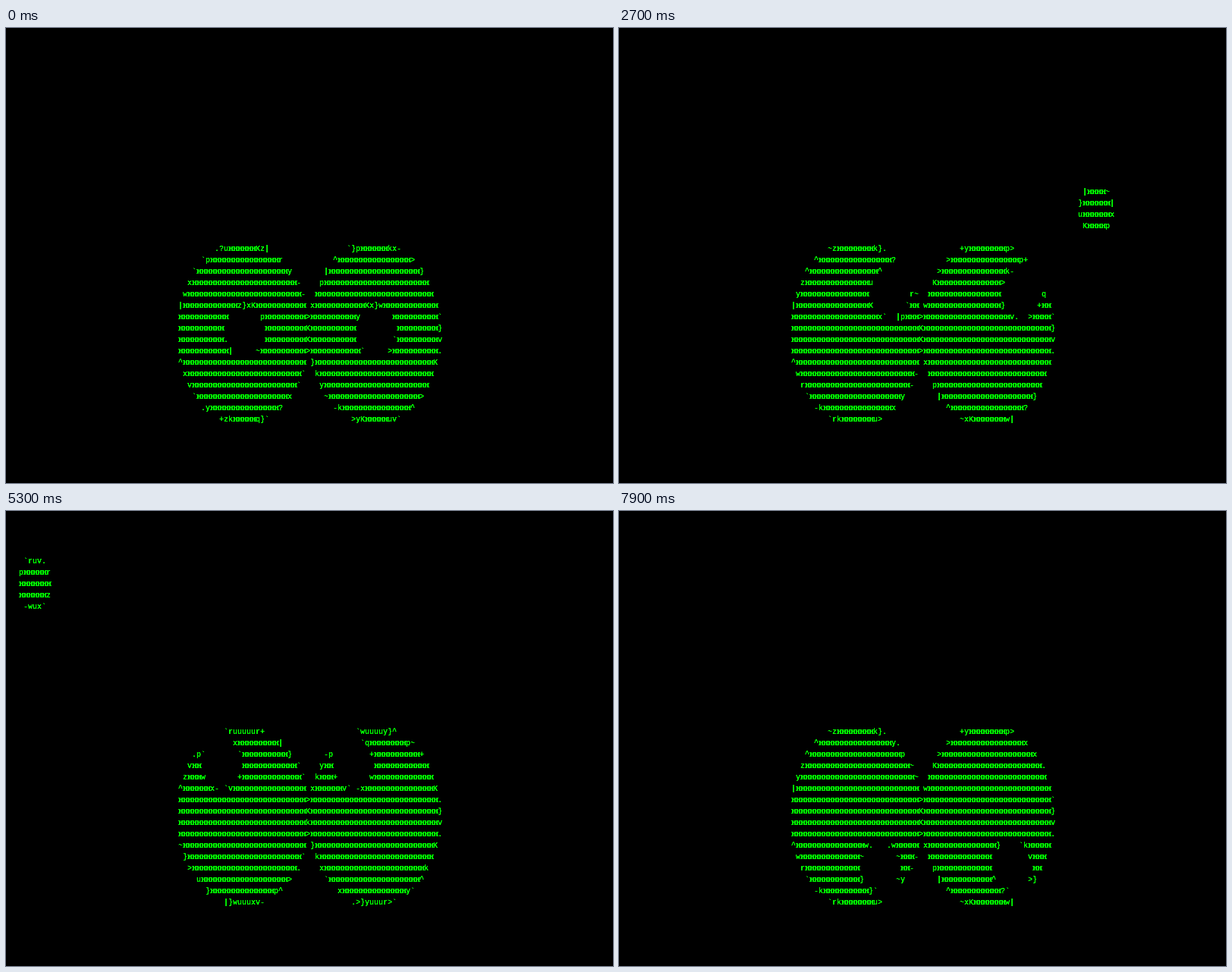
Write an HTML page with a canvas that moves like this. It is 800 px wide and 600 px high and loops after 8 s.

```html
<!DOCTYPE html>
<html lang="en">
<head>
<meta charset="utf-8">
<title>Watching eyes</title>
<style>
  html, body { margin: 0; width: 100%; height: 100%; overflow: hidden; background: #000; }
  canvas { display: block; width: 800px; height: 600px; }
</style>
</head>
<body>
<canvas id="stage" width="800" height="600"></canvas>
<script>
const ctx = document.getElementById('stage').getContext('2d');

const LOOP = 8000, STEP = 100;
const GREEN = '#00ff00';
const RAMP = '.`-~^|+>?v}rxzwyuqpkK';   // faint to bright, then H
const FAINT = 0.02, FULL = 0.47;        // coverage limits of the ramp
const CW = 6, CH = 15, X0 = 227, Y0 = 291;  // text grid
const ASPECT = 1.83;                    // columns per row unit

const EYE = { x: [14.3, 43.1], y: 7.97, w: 7.74, h: 7.75 };
const PUPIL = { dx: 0.25, y: 7.87, r: 2.62, reach: 5.25 };
const BALL_R = 1.87;

// Key points: time, column, row
const BALL = [
  [2300, 102, -1.2], [2700, 66.95, -2.83], [3600, -10.3, -11.9], [4300, -27.1, -13.85],
  [5300, -31.6, -12.47], [6100, -20.6, 5.1], [6500, 5, 24]
];
// Key points: time, gaze angle in degrees
const GAZE = [
  [1300, -8], [2700, -41], [4300, -140.5], [5300, -121],
  [6100, -185.5], [6500, -258], [7900, -301]
];

// Smooth curve through keys, sampled at t
function curve(keys, t, k) {
  const last = keys.length - 1;
  if (t <= keys[0][0]) return keys[0][k];
  if (t >= keys[last][0]) return keys[last][k];
  let i = 0;
  while (t >= keys[i + 1][0]) i++;
  const slope = n => {
    const a = keys[Math.max(n - 1, 0)], b = keys[Math.min(n + 1, last)];
    return (b[k] - a[k]) / (b[0] - a[0]);
  };
  const a = keys[i], b = keys[i + 1];
  const d = b[0] - a[0], u = (t - a[0]) / d, v = 1 - u;
  return a[k] * (1 + 2 * u) * v * v + b[k] * u * u * (3 - 2 * u)
    + d * (slope(i) * u * v * v - slope(i + 1) * u * u * v);
}

function smooth(a, b, t) {
  const u = Math.min(1, Math.max(0, (t - a) / (b - a)));
  return u * u * (3 - 2 * u);
}

const blink = (t, mid, spread) => Math.exp(-(((t - mid) / spread) ** 2) / 2);

function pose(t) {
  const open = 1 - blink(t, 660, 235) - blink(t, 4790, 207);
  const angle = curve(GAZE, t, 1) * Math.PI / 180;
  const reach = PUPIL.reach * smooth(1300, 2100, t);
  return {
    h: EYE.h * Math.max(0, open),
    px: PUPIL.dx + reach * Math.cos(angle) * ASPECT,
    py: PUPIL.y + reach * Math.sin(angle),
    bx: curve(BALL, t, 1),
    by: curve(BALL, t, 2)
  };
}

function inCircle(x, y, cx, cy, r) {
  const dx = (x - cx) / ASPECT, dy = y - cy;
  return dx * dx + dy * dy < r * r;
}

function inEye(x, y, cx, h) {
  const r = Math.min(EYE.w, h);
  const dx = Math.max(0, Math.abs(x - cx) / ASPECT - EYE.w + r);
  const dy = Math.max(0, Math.abs(y - EYE.y) - h + r);
  return dx * dx + dy * dy < r * r;
}

function lit(x, y, p) {
  return inCircle(x, y, p.bx, p.by, BALL_R) || EYE.x.some(cx =>
    inEye(x, y, cx, p.h) && !inCircle(x, y, cx + p.px, p.py, PUPIL.r));
}

// Lit share of one character cell
function coverage(col, row, p) {
  const n = 8;
  let hits = 0;
  for (let j = 0; j < n; j++)
    for (let i = 0; i < n; i++)
      if (lit(col + (i + 0.5) / n, row + (j + 0.5) / n, p)) hits++;
  return hits / (n * n);
}

function glyph(c) {
  if (c < FAINT) return '';
  if (c >= FULL) return 'H';
  return RAMP[Math.floor((c - FAINT) / (FULL - FAINT) * RAMP.length)];
}

// Crisp terminal-style glyph tiles
const tiles = {};
function tile(ch) {
  if (tiles[ch]) return tiles[ch];
  const c = document.createElement('canvas');
  c.width = 8;
  c.height = 14;
  const g = c.getContext('2d');
  g.fillStyle = GREEN;
  if (ch === 'H') {
    for (const x of [1, 5])
      for (const y of [4, 9]) g.fillRect(x, y, 3, 1);
    for (const x of [2, 5]) g.fillRect(x, 4, 2, 6);
    g.fillRect(2, 6, 5, 1);
  } else {
    g.font = 'bold 10px "Liberation Mono", "Courier New", monospace';
    g.fillText(ch, 1, 10);
    const img = g.getImageData(0, 0, 8, 14);
    for (let i = 3; i < img.data.length; i += 4)
      img.data[i] = (img.data[i] - 50) * 2;
    g.putImageData(img, 0, 0);
  }
  return tiles[ch] = c;
}

function draw(t) {
  const p = pose(t);
  ctx.fillStyle = '#000';
  ctx.fillRect(0, 0, 800, 600);
  for (let row = -19; row <= 20; row++)
    for (let col = -38; col <= 95; col++) {
      const ch = glyph(coverage(col, row, p));
      if (ch) ctx.drawImage(tile(ch), X0 + col * CW - 1, Y0 + row * CH - 7);
    }
}

const start = performance.now();
let shown = -1;
function tick() {
  const t = Math.floor((performance.now() - start) % LOOP / STEP) * STEP;
  if (t !== shown) draw(shown = t);
  requestAnimationFrame(tick);
}
tick();
</script>
</body>
</html>
```
